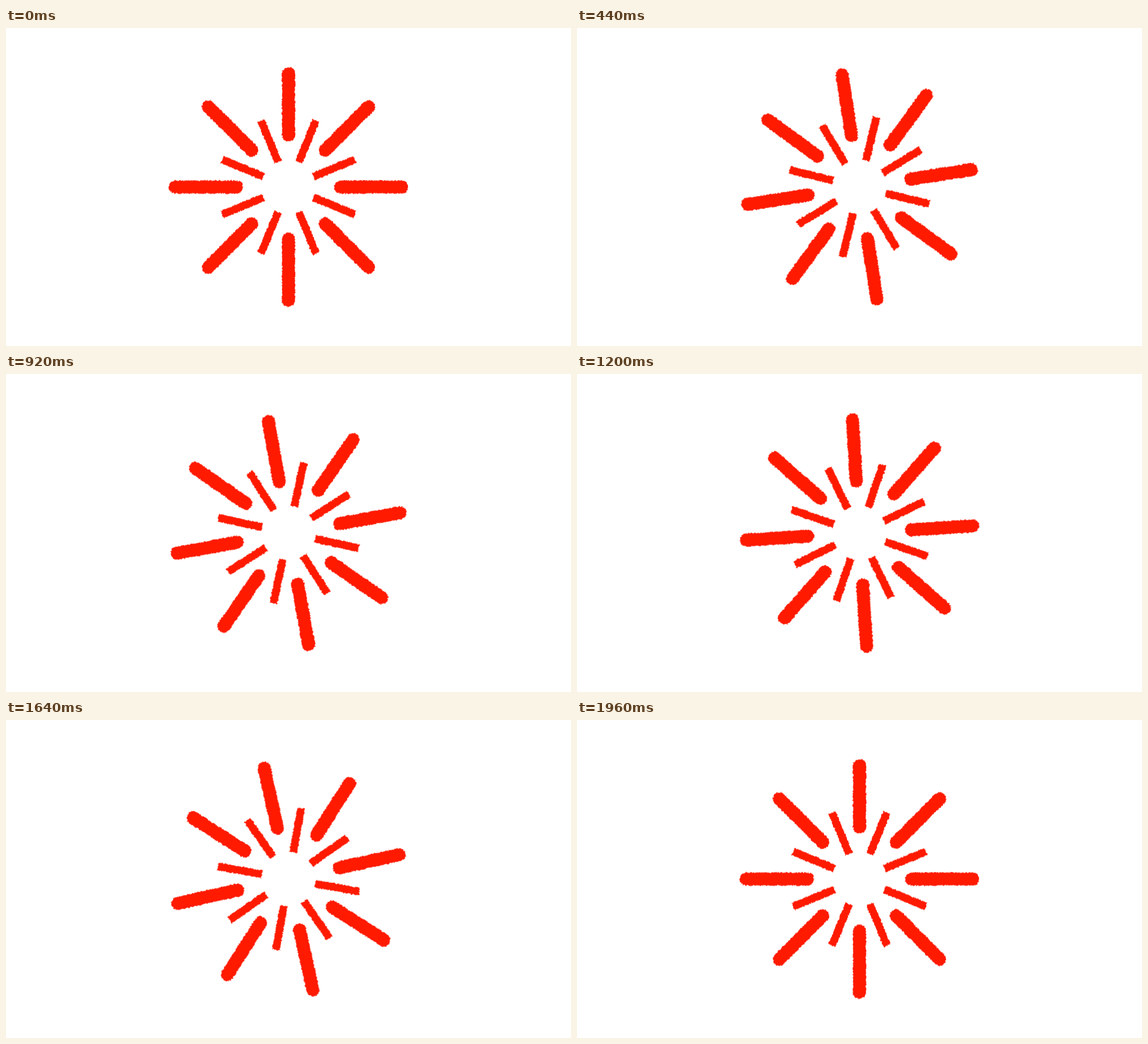
Animation, 998 px wide and 561 px high, one loop 2000 ms. Source, as an HTML page:

```html
<!DOCTYPE html>
<html lang="en">
<head>
<meta charset="utf-8">
<title>Spinning burst</title>
<style>
  html, body { margin: 0; width: 100%; height: 100%; overflow: hidden; background: #fff; }
  svg { display: block; }
  #burst { fill: #ff1a00; }
</style>
</head>
<body>
<svg width="998" height="561">
  <g transform="translate(499 280.5)"><g id="burst"></g></g>
</svg>
<script>
const NS = 'http://www.w3.org/2000/svg';
const burst = document.getElementById('burst');

let seed = 7;
function random() {
  seed = (seed * 16807) % 2147483647;
  return seed / 2147483647;
}
const jitter = size => (random() * 2 - 1) * size;

function makePath(d) {
  const path = document.createElementNS(NS, 'path');
  path.setAttribute('d', d);
  return path;
}

// Walks along a clean outline and shakes every point for a chalky edge.
function roughen(d, size) {
  const outline = makePath(d);
  const length = outline.getTotalLength();
  const points = [];
  for (let s = 0; s < length; s += 0.9) {
    const p = outline.getPointAtLength(s);
    points.push((p.x + jitter(size)).toFixed(2) + ' ' + (p.y + jitter(size)).toFixed(2));
  }
  return 'M' + points.join('L') + 'Z';
}

function addBar(d, angle) {
  const bar = makePath(roughen(d, 1.2));
  bar.setAttribute('transform', `rotate(${angle})`);
  burst.append(bar);
}

const pill = (r, inner, outer) =>
  `M${-r} ${-inner}V${-outer}A${r} ${r} 0 0 1 ${r} ${-outer}V${-inner}A${r} ${r} 0 0 1 ${-r} ${-inner}Z`;
const slab = (r, inner, outer) => `M${-r} ${-inner}V${-outer}H${r}V${-inner}Z`;

for (let i = 0; i < 8; i++) {
  addBar(pill(11.5, 92, 200), i * 45);
  addBar(slab(6.8, 47.8, 127), i * 45 + 22.5);
}

// Constant turn in 40 ms steps, resting upright on the last one.
const STEP = 7.381;
const turn = deg => `rotate(${deg}deg)`;
burst.animate([
  { offset: 0, transform: turn(0), easing: 'steps(49, end)' },
  { offset: 0.98, transform: turn(49 * STEP) },
  { offset: 0.98, transform: turn(360) },
  { offset: 1, transform: turn(360) }
], { duration: 2000, iterations: Infinity });
</script>
</body>
</html>
```
